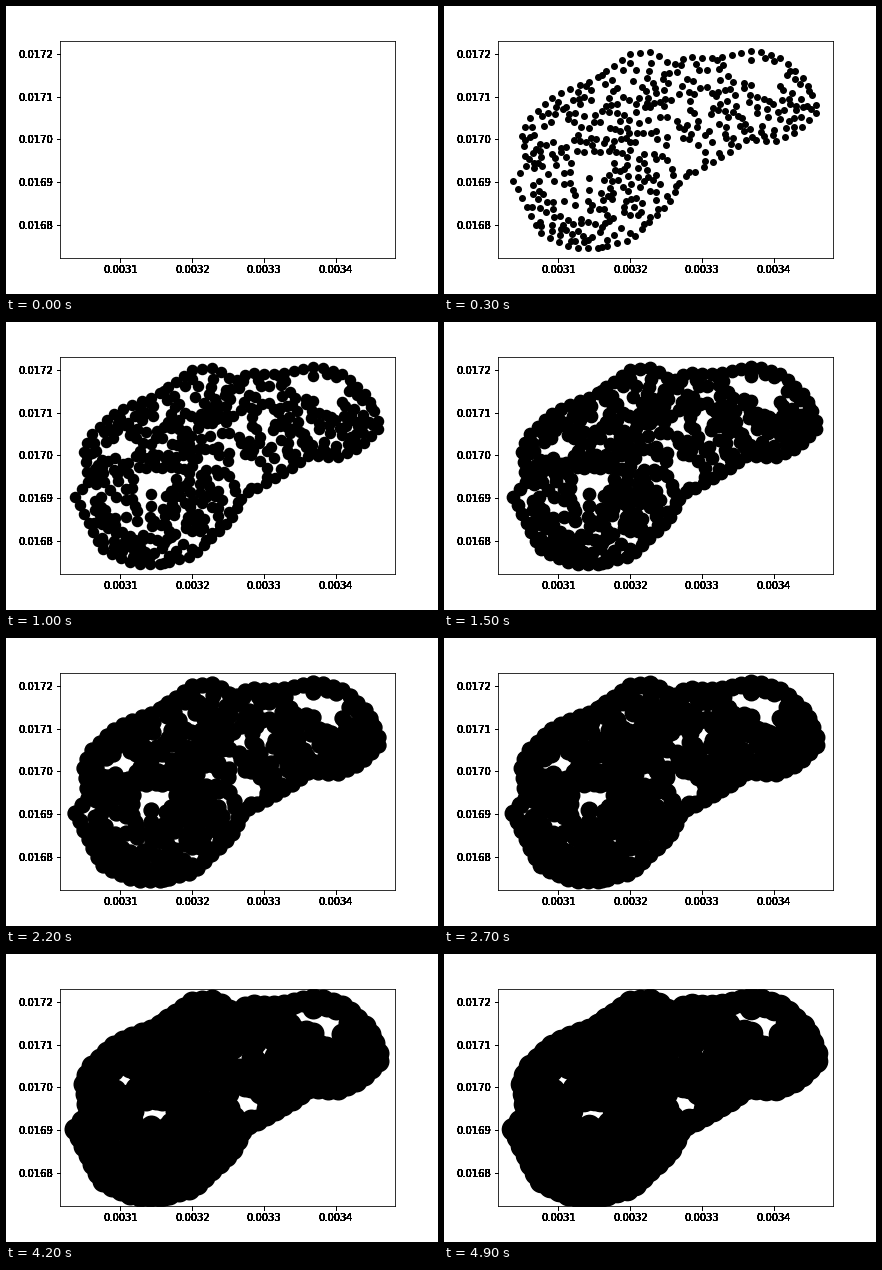
These frames come from a looping animation (432x288 px, 5000 ms). A matplotlib script:

```python
import numpy as np
import matplotlib.pyplot as plt
from matplotlib.animation import FuncAnimation
from matplotlib.path import Path

WIDTH, HEIGHT, DPI = 432, 288, 72
LEFT, RIGHT, TOP, BOTTOM = 54, 388.8, 34.56, 252
FRAMES, INTERVAL = 50, 100
DOTS, RIM_STEP, MIN_GAP = 450, 10, 4.5
LABEL_PASSES = 16  # labels drawn over themselves lose their soft edges

# Key points of the cloud's outline, in stage pixels.
OUTLINE = np.array([
    (69.5, 175), (82, 160), (78, 127), (86, 112), (110, 90), (151, 73),
    (188, 47), (210, 46), (228, 60), (243, 50), (265, 53), (311, 44.6),
    (338, 53), (361, 74), (374.4, 105), (351, 127), (333, 135), (302, 134),
    (283, 148), (266, 158), (238, 172), (225, 197), (187, 234), (155, 242),
    (127, 242), (95, 226), (80, 196),
])

# The largest empty spots: x, y, radius.
HOLES = np.array([(296, 62, 12.5), (316, 71, 12), (152, 161, 12.5), (247, 154, 12.5)])


def walk_outline():
    loop = np.vstack([OUTLINE, OUTLINE[:1]])
    travelled = np.append(0, np.cumsum(np.hypot(*np.diff(loop, axis=0).T)))
    stops = np.arange(0, travelled[-1] - RIM_STEP / 2, RIM_STEP)
    return np.column_stack([np.interp(stops, travelled, axis) for axis in loop.T])


def distances(point, others):
    return np.hypot(*(others - point).T)


def scatter_cloud():
    rng = np.random.default_rng(7)
    shape = Path(OUTLINE)
    low, high = OUTLINE.min(axis=0), OUTLINE.max(axis=0)
    cloud = list(walk_outline())
    while len(cloud) < DOTS:
        spot = rng.uniform(low, high)
        if (shape.contains_point(spot)
                and np.all(distances(spot, HOLES[:, :2]) > HOLES[:, 2])
                and np.all(distances(spot, np.array(cloud)) > MIN_GAP)):
            cloud.append(spot)
    return np.array(cloud)


def add_axes(fig):
    ax = fig.add_axes([LEFT / WIDTH, 1 - BOTTOM / HEIGHT,
                       (RIGHT - LEFT) / WIDTH, (BOTTOM - TOP) / HEIGHT],
                      facecolor="none")
    ax.set(xlim=(LEFT, RIGHT), ylim=(BOTTOM, TOP))
    ax.set_xticks(114.5 + 71.8 * np.arange(4),
                  [f"{0.0031 + k * 1e-4:.4f}" for k in range(4)])
    ax.set_yticks(218.7 - 42.65 * np.arange(5),
                  [f"{0.0168 + k * 1e-4:.4f}" for k in range(5)])
    return ax


plt.rcParams.update({"font.family": "DejaVu Sans", "font.size": 10})
fig = plt.figure(figsize=(WIDTH / DPI, HEIGHT / DPI), dpi=DPI, facecolor="white")
ax, *overlays = [add_axes(fig) for _ in range(LABEL_PASSES)]
for overlay in overlays:
    overlay.spines[:].set_visible(False)
dots = ax.scatter(*scatter_cloud().T, s=0, c="black", linewidths=1.5)


def update(frame):
    dots.set_sizes([10 * frame])
    dots.set_visible(frame > 0)
    return dots,


anim = FuncAnimation(fig, update, frames=FRAMES, interval=INTERVAL,
                     repeat=True, repeat_delay=0)
plt.show()
```
